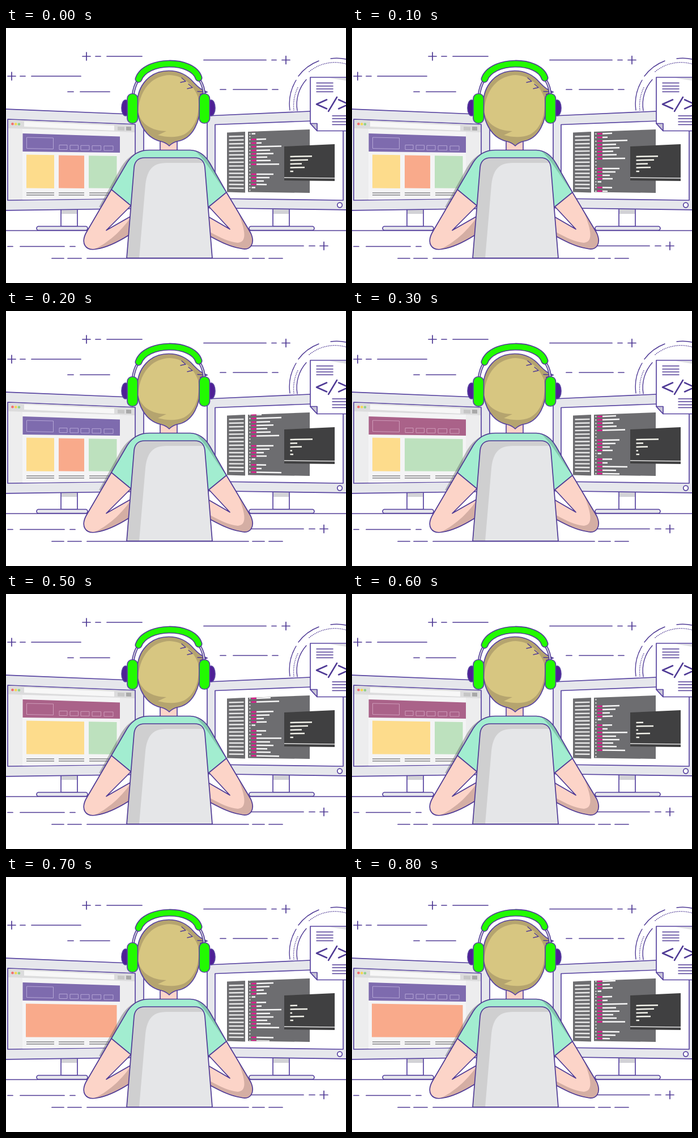
Animation of 600 by 450 pixels, one loop 900 ms. Source, as an HTML page:

```html
<!DOCTYPE html>
<html lang="en">
<head>
<meta charset="utf-8">
<title>Developer at work</title>
<style>
html, body { margin: 0; width: 100%; height: 100%; overflow: hidden; background: #fff; }
svg { display: block; width: 100vw; height: 100vh; }
.ln { fill: none; stroke: #4f3a95; stroke-width: 1.7; stroke-linecap: round; stroke-linejoin: round; }
.o { stroke: #5743a0; stroke-width: 1.7; stroke-linejoin: round; }
</style>
</head>
<body>
<svg viewBox="0 0 600 450">
  <defs>
    <clipPath id="pane"><path d="M427 183L536 179V291L427 289Z"/></clipPath>
  </defs>

  <!-- backdrop strokes -->
  <path class="ln" d="M135 50h14M142 43v14M158 50h9M178 50h62M3 85h14M10 78v14M25 85h9M45 85h87
    M109 112.500h10M131 112.500h52M349 56.500h110M469 56.500h8M487 56.500h14M494 49.500v14M378 108.500h10M401 108.500h60M470 108.500h10
    M0 357.500h155M425 357.500h175M3 385.500h9M25 385.500h78M113 385.500h9M430 384.500h95M535 384.500h10M554 384.500h14M561 377.500v14
    M81 406.500h21M109 406.500h24M143 406.500h285M435 406.500h21M464 406.500h24"/>
  <g class="ln" style="stroke-width:1.4">
    <path d="M501 145A80 80 0 0 1 512 92M516 85A80 80 0 0 1 552 58M573 54A80 80 0 0 1 600 55"/>
    <path d="M508 145A72 72 0 0 1 516 103M535 77A72 72 0 0 1 602 64" stroke-dasharray="0.500 2.600"/>
    <path d="M514 146A66 66 0 0 1 530 91"/>
  </g>

  <!-- left monitor -->
  <g class="o" fill="#e6e7ec">
    <path d="M97 318H126V350H97Z" fill="#fff"/>
    <path d="M98 319H125V328H98Z" fill="#d2d2d6" stroke="none"/>
    <rect x="54" y="350" width="90" height="7" rx="3.500"/>
    <path d="M-3 143L243 153V318.500L-3 322Z"/>
    <path d="M3 161L228 170V301L3 304Z" fill="#ededee"/>
  </g>
  <path d="M4 162L227 171V184L4 177Z" fill="#dcdcdd"/>
  <path d="M29 178L201 183V301L29 303Z" fill="#f4f4f5"/>
  <path d="M32 165L191 172V181L32 174Z" fill="#f7f7f7"/>
  <path d="M197 174L209 174.500V181L197 180.500Z" fill="#c6c6c6"/>
  <path d="M212 174L221 174.300V181L212 180.700Z" fill="#a8a8a8"/>
  <circle cx="11.500" cy="169.300" r="2.300" fill="#f26d6d"/>
  <circle cx="17.300" cy="169.500" r="2.300" fill="#f4d84f"/>
  <circle cx="23" cy="169.700" r="2.300" fill="#8fd08a"/>
  <path id="head" d="M29.500 186L201 191.500V220L29.500 218Z"/>
  <path id="nav" fill="none" stroke="#b5a6d6"/>
  <g id="cards"></g>
  <path d="M36 291H85M93 291H138M147 291H195M36 294.700H85M93 294.700H138M147 294.700H195" stroke="#858588" stroke-width="1.400"/>

  <!-- right monitor -->
  <g class="o" fill="#e6e7ec">
    <path d="M471 318H500V350H471Z" fill="#fff"/>
    <path d="M472 319H499V328H472Z" fill="#d2d2d6" stroke="none"/>
    <rect x="429" y="350" width="115" height="7" rx="3.500"/>
    <path d="M355 155L604 144V321L355 317.500Z"/>
    <path d="M369 170.500L595 162V304L369 301Z" fill="#fff"/>
    <circle cx="589" cy="312.500" r="4.300" fill="#fff"/>
  </g>
  <path d="M390 184.500L422 183V290.500L390 289.500Z" fill="#6d6d70"/>
  <path id="index" stroke="#e9e9e9" stroke-width="2.400"/>
  <path d="M427 183L536 179V291L427 289.500Z" fill="#6d6d70"/>
  <g clip-path="url(#pane)" stroke-width="2.500">
    <path id="dots" stroke="#f2f2f2" stroke-width="2.200"/>
    <path id="keys" stroke="#e5188f"/>
    <path id="code" stroke="#f7f7f7"/>
  </g>
  <path d="M491 209L580 205V270L491 269Z" fill="#404041"/>
  <path d="M491 264L580 265" stroke="#e4e4e4" stroke-width="1.600"/>
  <path id="term" stroke="#f2f2ea" stroke-width="2.500"/>

  <!-- document -->
  <path class="o" d="M537 87H606V181.500H549L537 168.500Z" fill="#fff"/>
  <path d="M570 88H600V93Z" fill="#dfdfe4"/>
  <path class="o" d="M537 168.500H549V181.500Z" fill="#c9c6d8"/>
  <path class="ln" style="stroke-width:1.4" d="M548 97h29M548 102.500h29M548 107.500h29M548 112.500h29M576 155h30M576 160h30M576 165.500h30M576 170.500h30"/>
  <path class="ln" style="stroke-width:2.5" d="M566 126.500L548 134.500L566 142.500M584 122L569 147M587 126.500L605 134.500L587 142.500"/>

  <!-- body -->
  <path d="M243 215C222 221 211 233 203 246L164 316L182 318L212 280Z" fill="#55555c" opacity=".4"/>
  <g fill="#fcd4c8">
    <path d="M186 285L141 362C132 380 140 394 160 390C180 387 200 376 216 366L219 333L177 357L221 313Z"/>
    <path d="M389 290L432 362C440 380 432 394 414 389C395 386 380 378 361 368L357 333L395 355L356 313Z"/>
  </g>
  <path d="M154 391C180 380 203 358 218 337L216 366C200 376 180 387 160 390Z
    M408 322L432 362C440 380 432 394 414 389C395 386 380 378 361 368L360 360C378 370 395 378 409 379C424 378 425 361 408 322Z" fill="#d4aea4"/>
  <path class="ln" d="M186 285L141 362C132 380 140 394 160 390C180 387 200 376 216 366M219 333L177 357L221 313
    M389 290L432 362C440 380 432 394 414 389C395 386 380 378 361 368M357 333L395 355L356 313"/>
  <path class="o" d="M272 194H302V220H272Z" fill="#fcd4c8"/>
  <path d="M253 215.500H325C340 216 352 225 360 239L389 290L356 317L300 260L221 314L186 285L214 237C223 223 237 215.500 253 215.500Z" fill="#a2edd0"/>
  <path d="M334 217C347 220 354 229 360 239L389 290C371 269 358 240 334 217Z" fill="#83c6ae"/>
  <path class="ln" d="M221 314L186 285L214 237C223 223 237 215.500 253 215.500H325C340 216 352 225 360 239L389 290L356 317"/>
  <path d="M213 406L226 246Q228 229 245 229H333Q349 229 351 246L364 406Z" fill="#cfcfd0"/>
  <path d="M235 406L246 277C249 247 262 238 284 238H350L364 406Z" fill="#e5e6e8"/>
  <path class="ln" d="M213 406L226 246Q228 229 245 229H333Q349 229 351 246L364 406Z"/>

  <!-- head and headphones -->
  <ellipse class="o" cx="211" cy="141" rx="7" ry="14" fill="#4f1f96"/>
  <ellipse class="o" cx="362" cy="141" rx="7" ry="14" fill="#4f1f96"/>
  <path class="o" d="M231.500 135C231.500 100 255 75.500 287 75.500C309 75.500 322 85 332 97Q343 109 355 113L343 117C346 168 328 196 302 200Q294 202 288 208Q282 202 273 200C249 195 231.500 170 231.500 135Z" fill="#b5a46f"/>
  <path d="M233 148C235 112 255 84 289 83C315 84 332 103 339 122C343 153 333 178 314 188C300 194 284 193 268 189L283 182C258 182 238 170 233 148Z" fill="#d7c681"/>
  <path class="ln" style="stroke-width:1.3" d="M310 88L317 94L308 96M322 99L329 105L320 107M338 112L355 113L343 117"/>
  <g fill="none" stroke-linecap="round">
    <path d="M233 92Q226 103 224 119M342 92Q349 103 350 119" stroke="#4f3a95" stroke-width="5"/>
    <path d="M233 92Q226 103 224 119M342 92Q349 103 350 119" stroke="#d5d4df" stroke-width="2"/>
    <path d="M234 90C246 55 329 54 340 88" stroke="#4f3a95" stroke-width="13"/>
    <path d="M234 90C246 55 329 54 340 88" stroke="#22fb00" stroke-width="9.800"/>
  </g>
  <g class="o" fill="#22fb00">
    <rect x="214" y="116" width="18.500" height="52" rx="8.500"/>
    <rect x="341" y="116" width="18.500" height="52" rx="8.500"/>
  </g>
</svg>
<script>
const el = id => document.getElementById(id);
const STEP = 100, STEPS = 9;

// page layouts: header colour, then cards as [left, right, colour]
const YELLOW = '#fddc8c', ORANGE = '#f9aa8b', GREEN = '#bde1be';
const PURPLE = '#7e6bae', MAUVE = '#aa6289';
const pages = [
  [PURPLE, [36, 85, YELLOW], [93, 138, ORANGE], [146, 195.5, GREEN]],
  [MAUVE, [36, 85, YELLOW], [93, 195.5, GREEN]],
  [MAUVE, [36, 138, YELLOW], [146, 195.5, GREEN]],
  [PURPLE, [35, 195.5, ORANGE]]
];

// code rows: [offset in cycle, line end]; no end means a blank line
const CYCLE = 95, SCROLL = 10;
const rows = [
  [0, 472], [6, 465], [12, 455], [18, 460], [23.5, 440], [28.5],
  [33.5, 459], [40, 451], [46.5, 486], [53, 466], [59, 472],
  [65, 461], [71, 467], [77.5, 482], [83], [89]
];

// terminal line ends
const logs = [
  [540, 533, 522, 527, 507],
  [541, 514, 522, 505, 507],
  [514, 532, 505, 526, 507]
];
const logOrder = [0, 0, 1, 1, 0, 0, 2, 2, 0];

// a line that follows the tilt of the screen at height y
function seg(x1, x2, y) {
  const slope = -0.037 + (y - 183) / 106 * 0.055;
  const at = x => (y + (x - 441) * slope).toFixed(2);
  return `M${x1} ${at(x1)}L${x2} ${at(x2)}`;
}

function drawPage(k) {
  const [color, ...cards] = pages[k < 3 ? 0 : Math.floor((k - 1) / 2)];
  el('head').setAttribute('fill', color);
  el('nav').setAttribute('stroke', color === MAUVE ? '#cf9cba' : '#b5a6d6');
  el('cards').innerHTML = cards.map(([l, r, c]) => {
    const top = x => 223.5 + (x - 36) * 0.016;
    return `<path d="M${l} ${top(l)}L${r} ${top(r)}V283L${l} 282.5Z" fill="${c}"/>`;
  }).join('');
}

function drawCode(k) {
  let dots = '', keys = '', code = '';
  for (let n = -2; n < 3; n++) {
    for (const [off, end] of rows) {
      const y = 258 - SCROLL * k + off + CYCLE * n;
      if (y < 178 || y > 294) continue;
      dots += seg(429.5, 431.3, y);
      if (!end) continue;
      if (end > 440) keys += seg(433, 441.5, y);
      code += seg(end > 440 ? 442 : 433.5, end, y);
    }
  }
  el('dots').setAttribute('d', dots);
  el('keys').setAttribute('d', keys);
  el('code').setAttribute('d', code);
}

function drawTerm(k) {
  el('term').setAttribute('d', logs[logOrder[k]].map((end, i) => {
    const y = 227 + i * 6.5;
    return `M501.5 ${y}L${end} ${y - (end - 501) * 0.02}`;
  }).join(''));
}

el('nav').setAttribute('d', 'M36.5 193L83.5 194V213.5L36.5 212.5Z' +
  [94, 113, 132, 152, 173].map((x, i) => {
    const y = 206.5 + i * 0.4;
    return `M${x} ${y}h${14 + i * 0.5}v8h${-14 - i * 0.5}Z`;
  }).join(''));
el('index').setAttribute('d', Array.from({ length: 15 }, (_, i) => {
  const y = 191.5 + i * 6.5;
  return `M393.5 ${y}L419.5 ${y - 0.6 + i * 0.06}`;
}).join(''));

let shown = -1;
const start = performance.now();
function frame() {
  const k = Math.floor(Math.max(0, performance.now() - start) / STEP) % STEPS;
  if (k !== shown) {
    drawPage(k);
    drawCode(k);
    drawTerm(k);
    shown = k;
  }
  requestAnimationFrame(frame);
}
frame();
</script>
</body>
</html>
```
